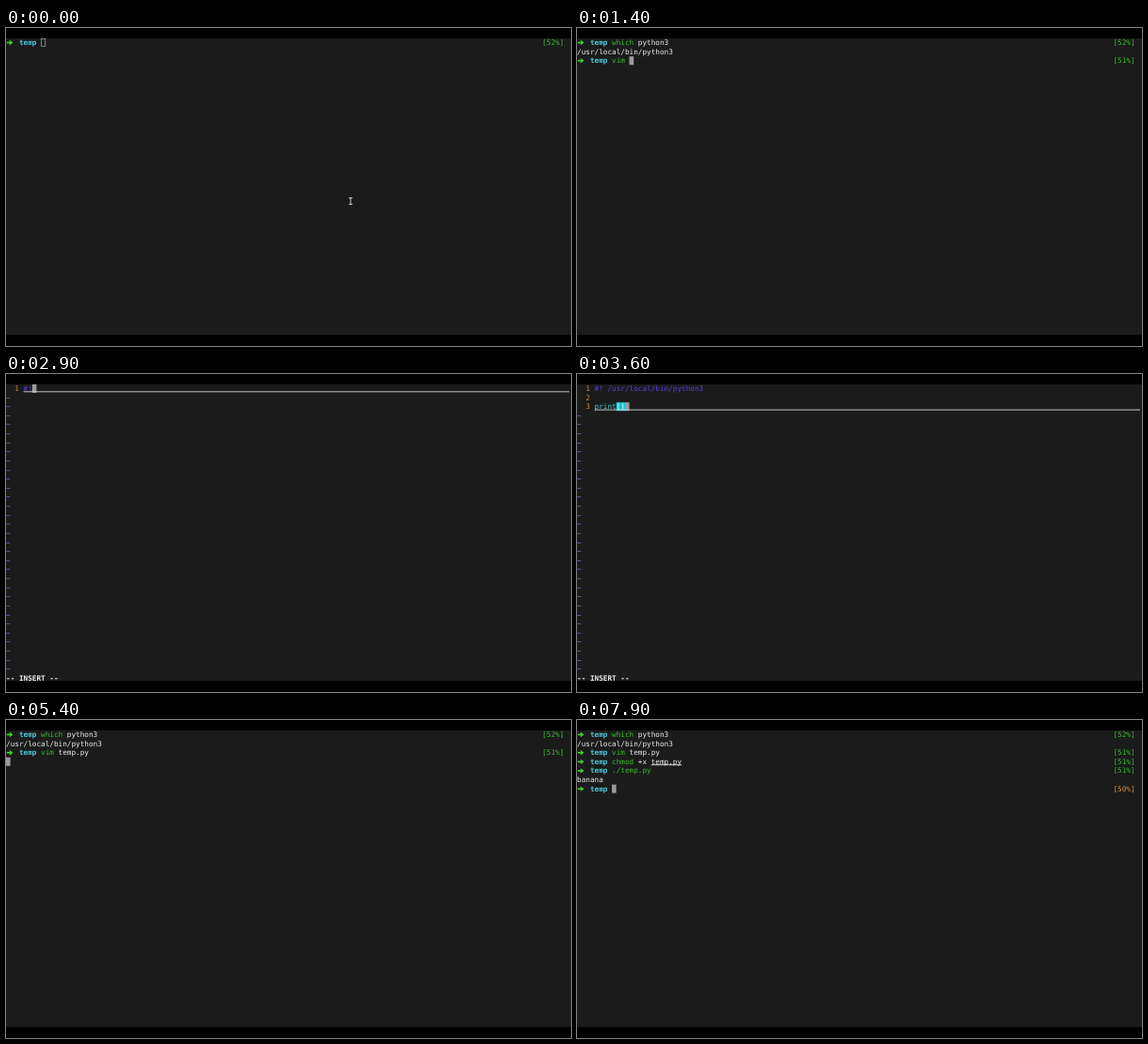
An HTML page that plays this animation: 600x338 px, repeating every 8 s.

```html
<!DOCTYPE html>
<html lang="en">
<head>
<meta charset="utf-8">
<title>Terminal</title>
<style>
html, body { margin: 0; width: 100%; height: 100%; overflow: hidden; background: #000; }
svg { display: block; width: 600px; height: 338px; }
text {
  font: 7.69px "DejaVu Sans Mono", "Liberation Mono", monospace;
  text-rendering: geometricPrecision;
  white-space: pre;
}
.b { font-weight: bold; }
</style>
</head>
<body>
<svg id="stage" viewBox="0 0 600 338"></svg>
<script>
const stage = document.getElementById('stage');
const LOOP = 8000, STEP = 100;
const CW = 4.63, RH = 9.62, TOP = 10.8, ROWS = 33;
const C = {
  bg: '#1b1b1b', text: '#ececec', green: '#36bd2b', bright: '#3ddb2a', cyan: '#4cc9dc',
  orange: '#dd8a3c', red: '#d0392d', num: '#cf7f3a', dimNum: '#a8702c',
  tilde: '#8468d8', comment: '#5a3bd8', match: '#12d3e0', cursor: '#9b9b9b'
};
const SHEBANG = '#! /usr/local/bin/python3';

const esc = s => s.replace(/&/g, '&amp;').replace(/</g, '&lt;');
const rowY = r => TOP + r * RH;
const rect = (x, y, w, h, fill) => `<rect x="${x}" y="${y}" width="${w}" height="${h}" fill="${fill}"/>`;
const put = (col, row, s, fill = C.text, cls = '') =>
  `<text x="${col * CW}" y="${rowY(row) + 7.2}" fill="${fill}" class="${cls}">${esc(s)}</text>`;
const under = (c0, c1, row) => rect(c0 * CW, rowY(row) + 7.6, (c1 - c0) * CW, 0.9, C.text);
const cell = (col, row, fill) => rect(col * CW, rowY(row) + 0.1, CW, RH - 0.6, fill);

// Part of s typed at time t when typing runs from t0 to t1
const typed = (s, t, t0, t1) =>
  s.slice(0, Math.max(0, Math.min(s.length, Math.round((t - t0) / (t1 - t0) * s.length))));

const COMMANDS = ['w', 'which', 'vi', 'vim', 'chmod', './temp.py'];

function promptLine(row, level, cmd = '', done = true) {
  const y = rowY(row) + 4.7;
  let out = `<path d="M0.8 ${y}H4.6" stroke="${C.bright}" stroke-width="1.7"/>` +
    `<path d="M3.6 ${y - 2.9}L7.4 ${y}L3.6 ${y + 2.9}L4.4 ${y}Z" fill="${C.bright}"/>`;
  out += put(3, row, 'temp', C.cyan, 'b');
  out += put(123, row, `[${level}%]`, level > 50 ? C.green : C.orange);
  const word = cmd.split(' ')[0];
  const known = COMMANDS.includes(word) || word.startsWith('./');
  out += put(8, row, word, known ? C.green : C.red, known ? '' : 'b');
  const rest = cmd.slice(word.length + 1);
  if (rest) out += put(9 + word.length, row, rest);
  const at = cmd.indexOf('temp.py');
  if (cmd.startsWith('chmod') && at > 0) out += under(8 + at, 15 + at, row);
  if (!done) out += cell(8 + cmd.length, row, C.cursor);
  return out;
}

// Each command: prompt time, typing start and end, enter, output time and text
const SHELL = [
  { at: 0, from: 100, to: 600, enter: 700, cmd: 'which python3', level: 52, reply: '/usr/local/bin/python3' },
  { at: 900, from: 1200, to: 1700, enter: 1800, cmd: 'vim temp.py', level: 51 },
  { at: 5500, from: 5700, to: 6500, enter: 6600, cmd: 'chmod +x temp.py', level: 51 },
  { at: 6800, from: 7100, to: 7500, enter: 7600, cmd: './temp.py', level: 51, reply: 'banana' },
  { at: 7900, from: 9000, to: 9100, enter: 9200, cmd: '', level: 50 }
];

function shell(t) {
  let out = '', row = 0, waiting = false;
  for (const s of SHELL) {
    if (t < s.at) break;
    const entered = t >= s.enter;
    waiting = entered;
    if (t === 0) {
      out += promptLine(0, s.level);
      return out + `<rect x="37.5" y="11.4" width="4.2" height="8" fill="none" stroke="#9a9a9a" stroke-width=".8"/>`;
    }
    out += promptLine(row++, s.level, typed(s.cmd, t, s.from, s.to), entered);
    if (entered && s.reply) out += put(0, row++, s.reply);
  }
  if (waiting) out += cell(0, row, C.cursor);
  return out;
}

function codeLine(row, s) {
  if (s[0] === '#') return put(4, row, s, C.comment);
  let out = '', col = 4;
  for (const part of s.match(/"[^"]*"?|print|[^"]/g) || []) {
    const fill = part === 'print' ? C.cyan : part[0] === '"' ? C.red : C.text;
    out += put(col, row, part, fill);
    col += part.length;
  }
  return out;
}

// Editor content: lines, cursor column, mode and bottom line
function editState(t) {
  const insert = t >= 2800 && t < 4400;
  const lines = [t < 3000 ? typed('#!', t, 2800, 2900) : SHEBANG];
  if (t >= 3100) lines.push('');
  if (t >= 3200) {
    let s = typed('print()', t, 3200, 3600);
    if (t >= 3800) s = 'print("' + typed('banana', t, 3800, 4200) + '")';
    lines.push(s);
  }
  let col = lines[lines.length - 1].length;
  if (t >= 3700) col -= 1;
  if (t >= 3800 && t < 4300) col -= 1;
  if (t >= 4400) col -= 1;
  let status = t < 2800 ? '"temp.py" [New File]' : '';
  if (insert) status = '-- INSERT --';
  else if (t >= 5100) status = '"temp.py" [New] 3L, 43C written';
  else if (t >= 4600) status = typed(':wq', t, 4500, 4800);
  return { lines, col, insert, status, command: t >= 4600 && t < 5100 };
}

function vim(t) {
  const { lines, col, insert, status, command } = editState(t);
  const cur = lines.length - 1, line = lines[cur];
  let out = '';
  const open = line.indexOf('('), close = line.indexOf(')');
  const paired = open > 0 && close > 0 &&
    (col === close || col === open || (insert && (col === close + 1 || col === open + 1)));
  if (paired) out += cell(4 + open, cur, C.match) + cell(4 + close, cur, C.match);
  if (!command) out += cell(4 + col, cur, C.cursor);
  lines.forEach((s, i) => {
    const n = insert ? String(i + 1).padStart(3)
      : i === cur ? String(i + 1) : String(cur - i).padStart(3);
    out += put(n.length - 1, i, n.trim(), insert || i !== cur ? C.num : C.dimNum);
    out += codeLine(i, s);
  });
  out += rect(4 * CW, rowY(cur) + 7.6, 598 - 4 * CW, 0.9, '#d8d8d8');
  if (t < 1900) return out;
  for (let r = lines.length; r < ROWS - 1; r++) out += put(0, r, '~', C.tilde);
  out += put(0, ROWS - 1, status, C.text, insert ? 'b' : '');
  if (command) out += cell(status.length, ROWS - 1, C.cursor);
  return out;
}

function pointer(t) {
  if (t >= 1200 || (t >= 200 && t < 700)) return '';
  const k = Math.max(0, Math.min(1, (t - 600) / 400));
  const e = k * k * (3 - 2 * k);
  const x = 366 - 264 * e, y = 184 - 160.5 * e;
  const d = `M${x - 2} ${y - 3.3}H${x + 2}M${x} ${y - 3.3}V${y + 3.3}M${x - 2} ${y + 3.3}H${x + 2}`;
  return `<path d="${d}" stroke="#000" stroke-width="2" fill="none"/>` +
    `<path d="${d}" stroke="#ddd" stroke-width="1" fill="none"/>`;
}

function draw(t) {
  const editing = t >= 1800 && t < 5300;
  stage.innerHTML = rect(0, 11, 600, 315.5, C.bg) +
    (editing ? vim(t) : shell(t)) + pointer(t) +
    rect(0, 0, 600, 11, '#000') + rect(0, 326.5, 600, 12, '#000');
}

let last = -1;
const start = performance.now();
function tick() {
  const t = Math.floor((performance.now() - start) % LOOP / STEP) * STEP;
  if (t !== last) draw(last = t);
  requestAnimationFrame(tick);
}
tick();
</script>
</body>
</html>
```
